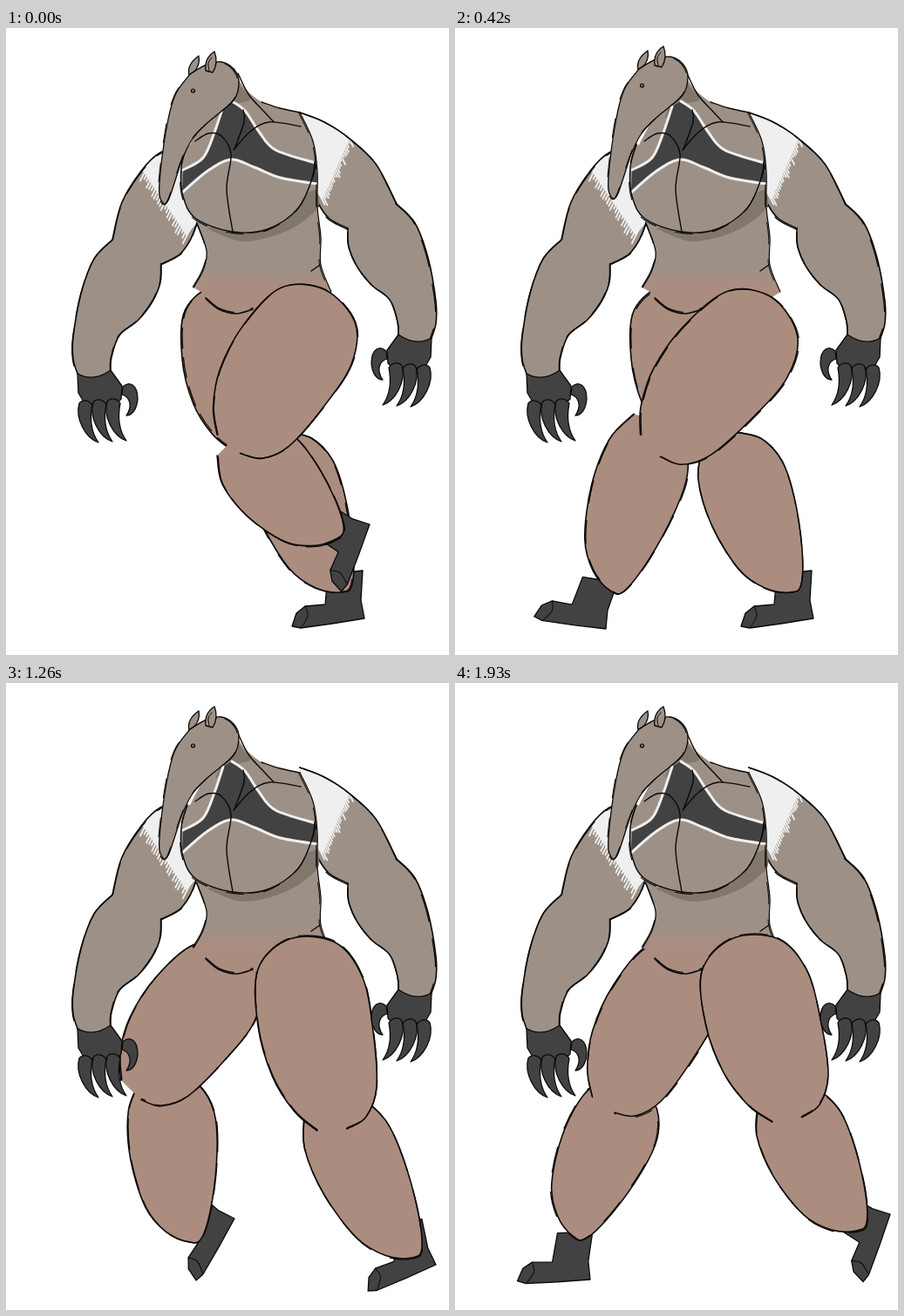
An HTML page for the animation above (2.1 s loop, 508 by 720 pixels).

```html
<!DOCTYPE html>
<html lang="en">
<head>
<meta charset="utf-8">
<title>Walk cycle</title>
<style>
html, body { margin: 0; width: 100%; height: 100%; overflow: hidden; background: #fff; }
svg { display: block; width: 100vw; height: 100vh; }
</style>
</head>
<body>
<svg id="stage" viewBox="0 0 508 720"></svg>
<script>
const FUR = '#9d9187', SKIN = '#ab8d80', DARK = '#424242', WHITE = '#efefef', SHADE = '#82776d', INK = '#0b0908';
const STEP = 420;

let seed = 7;
const rand = () => (seed = seed * 16807 % 2147483647) / 2147483647;
const pairs = s => s.split(', ').map(p => p.split(' ').map(Number));

// Smooth curve through the points, without the leading command.
function spline(p) {
  const at = i => p[Math.max(0, Math.min(p.length - 1, i))];
  const handle = (a, b, c) => [0, 1].map(k => (a[k] + (c[k] - b[k]) / 6).toFixed(1));
  return p[0] + p.slice(1).map((c, i) =>
    ` C${handle(p[i], at(i - 1), c)} ${handle(c, at(i + 2), p[i])} ${c}`).join('');
}

const path = (d, fill, stroke = 'none', w = 0, more = '') =>
  `<path d="${d}" fill="${fill}" stroke="${stroke}" stroke-width="${w}" ${more}/>`;
const fill = (color, ...edges) => path('M' + edges.map(spline).join(' L') + 'Z', color);
const line = (p, w = 1.4, color = INK, more = '') => path('M' + spline(p), 'none', color, w, more);
const shape = (color, d) => path(d + 'Z', color, INK, 1.3);
const group = (html, id, move = '') => `<g id="${id}" transform="${move}">${html}</g>`;

// A pen line with a loose, broken second pass.
function ink(p, w = 1.6) {
  const off = () => (rand() * 3 - 1.5).toFixed(1);
  const dash = `stroke-dasharray="${20 + rand() * 25 | 0} ${10 + rand() * 15 | 0}" transform="translate(${off()} ${off()})"`;
  return line(p, w) + line(p, w * .8, INK, dash);
}
const part = (color, p, w) => fill(color, p) + ink(p, w);

// Ragged brush edge from a to b.
function fringe(a, b, n) {
  let d = '';
  for (let i = 0; i <= n; i++) {
    const [x, y] = [0, 1].map(k => a[k] + (b[k] - a[k]) * i / n), r = 3 + rand() * 8;
    d += `M${x + 3} ${y - 5}l${-r / 2 - 2} ${r + 4}`;
  }
  return path(d, 'none', WHITE, 1.8);
}

// Limb outlines as (side, along) pairs; the thigh is 132 long, the shin 160.
const THIGH = pairs('-38 148, -56 120, -68 75, -66 15, -46 -45, 0 -66, 48 -46, 65 0, 58 60, 42 122, 20 150, -5 156');
const SHIN = pairs('-45 -10, -61 21, -62 70, -48 121, -26 148, 0 160, 15 156, 29 119, 38 66, 37 28, 22 0, -5 -15');

function limb(outline, length, from, to, wide = 1) {
  const dx = to[0] - from[0], dy = to[1] - from[1], l = Math.hypot(dx, dy);
  return part(SKIN, outline.map(([side, along]) => [
    +(from[0] + dy / l * side * wide + dx * along / length).toFixed(1),
    +(from[1] - dx / l * side * wide + dy * along / length).toFixed(1)]));
}

// The heel is the origin.
const foot = () =>
  shape(DARK, 'M-42 -50L-2 -55L-4 -21L0 0L-37 6L-73 11L-83 9L-78 -6L-68 -14L-45 -16') +
  line(pairs('-68 -14, -65 -3, -72 10'), 1);

function leg(joints, turn, wide) {
  const [hip, knee, shin, ankle, heel] = pairs(joints);
  return group(foot(), '', `translate(${heel}) rotate(${turn})`) +
    limb(SHIN, 160, shin, ankle) + limb(THIGH, 132, hip, knee, wide);
}

// Both arms share one drawing; the right one is mirrored, with its own shoulder.
const MIRROR = 'matrix(-1 0 0 1 570 -41)';
const OUTER = pairs('122 243, 101 265, 86 305, 77 355, 77 380, 82 397');
const INNER = pairs('120 394, 121 378, 130 353, 151 336, 168 314, 177 292, 178 271');
const PIT = pairs('178 271, 199 260, 211 244, 219 224');
const WRIST = pairs('82 397, 96 403, 110 401, 120 394');

function arm(shoulder, edge) {
  const top = pairs(shoulder), start = top[edge], end = [207, 238];
  return fill(FUR, top, OUTER, WRIST, INNER, PIT) +
    fill(WHITE, top.slice(0, edge + 1), [start, end], [end, [219, 224]]) + fringe(start, end, 24) +
    ink([...top, OUTER[0]]) + ink(OUTER) + line(WRIST) + ink(INNER) + ink(PIT);
}

function hand() {
  let s = shape(DARK, 'M82 397Q100 407 120 393L133 411L132 426L124 434L90 431L83 419') +
    shape(DARK, 'M134 412C141 405 151 409 151 426C150 439 144 445 138 445C145 435 143 424 133 421');
  for (let i = 0; i < 3; i++)
    s += group(shape(DARK, 'M84 431C79 448 91 471 106 476C97 463 96 448 99 433C95 427 87 426 84 431'), '',
      `translate(${16 * i} ${-i})`);
  return s;
}

function torso() {
  const neck = pairs('258 45, 273 68, 293 85, 314 92, 337 97');
  const right = pairs('337 97, 352 130, 357 165, 357 205, 361 240, 361 272, 373 303');
  const left = pairs('215 298, 226 278, 230 256, 219 224, 203 193, 201 160, 213 130');
  const bust = pairs('208 134, 201 160, 203 193, 218 219, 260 234, 300 231, 335 207, 352 170, 355 148');
  const strapL = pairs('203 163, 226 149, 239 120, 249 90');
  const strapR = pairs('259 84, 274 95, 290 119, 309 140, 355 155');
  const under = pairs('357 179, 315 172, 285 160, 258 151, 230 165, 202 189');
  return fill('url(#fade)', neck, right, pairs('345 322, 265 328'), left) +
    fill(SHADE, pairs('262 45, 268 65, 280 82, 262 88, 240 104')) +
    fill(SHADE, pairs('230 230, 272 245, 322 233, 357 207, 356 185')) + fill(FUR, bust) +
    fill(DARK, strapL, strapR, under) + [strapL, strapR, under].map(p => line(p, 3, WHITE)).join('') +
    line(pairs('266 52, 278 76, 295 95, 307 108')) + line(neck.slice(2)) +
    line(pairs('272 94, 273 108, 262 139')) +
    line(pairs('217 130, 232 121, 247 124, 258 145, 253 185, 260 234')) +
    line(pairs('261 140, 280 119, 302 108, 338 113')) +
    ink(bust, 1.4) + ink(left.slice(0, 4), 1.3) + ink(right, 1.2) +
    line(pairs('350 279, 360 272')) + ink(pairs('229 311, 244 323, 264 328, 283 323'));
}

const ear = d => shape(FUR, d);
const head = () =>
  ear('M210 54Q207 42 221 32Q223 42 216 50') +
  part(FUR, pairs('211 53, 230 42, 247 39, 261 47, 267 62, 261 83, 232 108, 214 127, 202 151, 186 198, 178 198, 176 178, 184 115, 194 77, 211 53'), 1.3) +
  ear('M229 49Q227 35 239 27Q244 40 237 51') + line(pairs('233 49, 232 40, 236 34'), 1) +
  `<circle cx="214.500" cy="72" r="2" fill="#777" stroke="${INK}" stroke-width="1.200"/>`;

// Joints: hip, knee, top of shin, ankle, heel; then the turn of the foot.
const planted = ['258 350, 290 462, 330 478, 384 648, 411 678', 0];
const poses = [
  { head: 0, arms: 0, chest: 0, back: planted,
    front: ['338 357, 283 470, 283 470, 378 587, 417 570', -61] },
  { head: -6, arms: 0, chest: 0, back: planted,
    front: ['327 365, 253 475, 243 470, 178 646, 173 690', 16] },
  { head: -6, arms: -5, chest: 0, back: ['258 362, 226 480, 265 490, 283 649, 308 651', -45],
    front: ['325 364, 323 500, 323 500, 335 660, 370 672', -14] },
  { head: 0, arms: 0, chest: 6, back: ['232 358, 170 462, 200 464, 210 642, 262 615', -52],
    front: ['347 358, 388 487, 388 487, 465 660, 493 668', -15] },
  { head: 0, arms: 0, chest: 6, back: ['244 358, 196 474, 212 480, 135 635, 155 685', 5],
    front: ['343 354, 393 475, 393 475, 460 629, 499 610', -62] }
];
const legs = (side, wide) => poses.map((p, i) => group(leg(...p[side], wide), side + i)).join('');

const stage = document.getElementById('stage');
stage.innerHTML =
  `<defs><linearGradient id="fade" gradientUnits="userSpaceOnUse" x1="0" y1="272" x2="0" y2="298">
    <stop offset="0" stop-color="${FUR}"/><stop offset="1" stop-color="${SKIN}"/></linearGradient></defs>
  <rect width="508" height="720" fill="#fff"/>
  <g stroke-linecap="round" stroke-linejoin="round">` +
  group(arm('208 133, 177 143, 156 163, 133 200', 2) + group(arm('233 138, 205 149, 176 168, 146 197', 2), '', MIRROR), 'arms') +
  legs('back', .94) + group(torso(), 'chest') + group(head(), 'head') + legs('front', 1) +
  group(hand() + group(hand(), '', MIRROR), 'hands') + '</g>';

const find = id => stage.querySelector('#' + id);
const shift = (id, y) => find(id).setAttribute('transform', `translate(0 ${y})`);

function draw(t) {
  const now = Math.floor(t / STEP) % poses.length, pose = poses[now];
  for (const id of ['head', 'arms', 'chest']) shift(id, pose[id]);
  shift('hands', pose.arms);
  poses.forEach((p, i) => ['back', 'front'].forEach(side =>
    find(side + i).setAttribute('display', i === now ? 'inline' : 'none')));
}

const start = performance.now();
function tick() {
  draw(performance.now() - start);
  requestAnimationFrame(tick);
}
tick();
</script>
</body>
</html>
```
